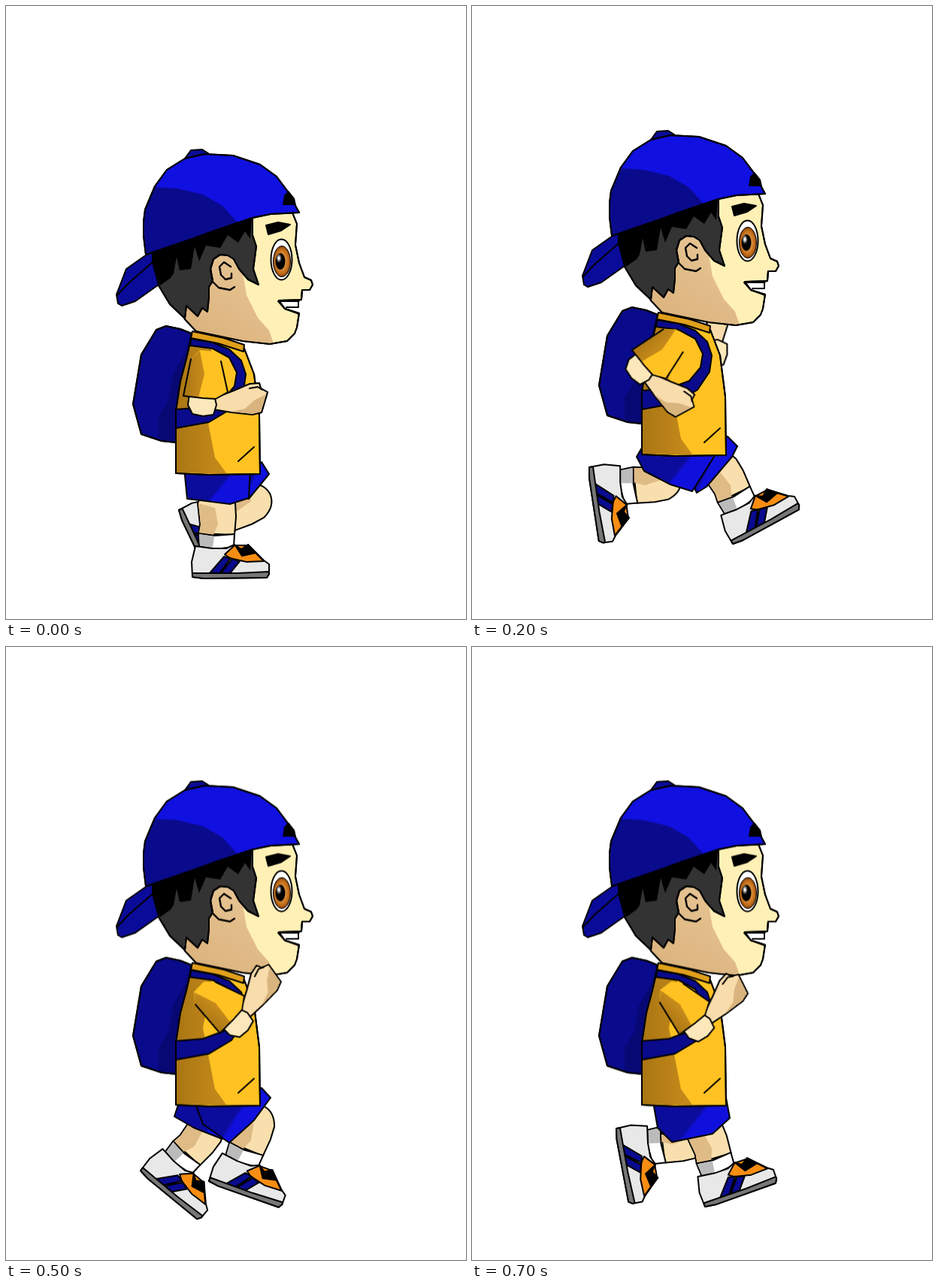
Recreate the animation shown at these times as an HTML page without scripts. Size 612x816 px, loop 0.8 s.

```html
<!DOCTYPE html>
<html lang="en">
<head>
<meta charset="utf-8">
<title>Walking boy</title>
<style>
html, body { margin: 0; width: 100%; height: 100%; overflow: hidden; background: #fff; }
svg { display: block; width: 100vw; height: 100vh; }
.ink { stroke: #000; stroke-width: 2; stroke-linejoin: round; stroke-linecap: round; }
.flat { stroke: none; }
.line { fill: none; }

.pose { visibility: hidden; animation: show .8s step-end infinite; animation-delay: calc(var(--i) * .1s - .8s); }
.bob { animation: bob .4s step-end infinite; }
.arm { transform-origin: 268px 473px; }
.near { animation: near .8s step-end infinite; }
.far { animation: far .8s step-end infinite; }

@keyframes show { 0% { visibility: visible } 12.5%, 100% { visibility: hidden } }
@keyframes bob {
  0%, 100% { transform: translateY(0) }
  25%, 75% { transform: translateY(-12.5px) }
  50% { transform: translateY(-25px) }
}
@keyframes near {
  0%, 50%, 100% { transform: rotate(0deg) }
  12.5% { transform: rotate(28deg) }
  25% { transform: rotate(45deg) }
  37.5% { transform: rotate(34deg) }
  62.5% { transform: rotate(-52deg) }
  75% { transform: rotate(-82deg) }
  87.5% { transform: rotate(-43deg) }
}
@keyframes far {
  0%, 50%, 100% { transform: rotate(0deg) }
  12.5%, 37.5% { transform: rotate(-52deg) }
  25% { transform: rotate(-82deg) }
  62.5% { transform: rotate(28deg) }
  75% { transform: rotate(45deg) }
  87.5% { transform: rotate(34deg) }
}
</style>
</head>
<body>
<svg viewBox="0 0 612 816">
<defs>
  <linearGradient id="shorts" x1="0" y1="0" x2="1" y2=".45">
    <stop offset=".63" stop-color="#0b0b9c"/><stop offset=".68" stop-color="#1010dc"/>
  </linearGradient>
  <linearGradient id="shade">
    <stop offset="0" stop-color="#aa7614"/><stop offset="1" stop-color="#c88c1b"/>
  </linearGradient>
  <linearGradient id="cheek" x1="0" y1="1" x2=".6" y2="0">
    <stop offset="0" stop-color="#d9ae78"/><stop offset="1" stop-color="#e8c796"/>
  </linearGradient>
  <radialGradient id="iris">
    <stop offset=".3" stop-color="#e79a45"/><stop offset=".8" stop-color="#c06c1a"/><stop offset="1" stop-color="#7d3d06"/>
  </radialGradient>
  <radialGradient id="pupil" cx=".35" cy=".3">
    <stop offset=".1" stop-color="#fff"/><stop offset=".4" stop-color="#555"/><stop offset=".6" stop-color="#000"/>
  </radialGradient>

  <path id="cap" d="M186 331L183 306V287L185 271L198 240L214 218L238 203L264 197L302 199L338 211L360 227L375 247L390 275L352 277L328 282L280 298L250 309Z"/>
  <path id="pack" d="M200 431L213 426L232 430L247 436L240 470L230 510L226 581L207 579L180 570L169 530L180 464Z"/>
  <path id="face" d="M200 325L328 270L381 275L387 290L385 318L390 342L397 361L406 365L408 371L404 378H394L393 391L363 392L371 403L390 409L387 428L384 436L374 446L351 450L315 446L253 433L238 417Z"/>
  <path id="hair" d="M192 322L195 343L203 372L218 397L238 416L240 399L255 413L261 402L268 407L270 388V374L275 366L272 350L276 337L285 331L295 332L303 337L310 350L322 364L336 371L329 350L333 320L328 305V270Z"/>
  <path id="shirt" d="M247 440L240 470L232 500L226 540V622L270 624L338 623L337 545L330 490L317 456Z"/>

  <g id="arm">
    <path fill="#f8dcab" d="M272 524L303 512L324 503L337 502L339 509L348 514L340 541L328 544L300 541L276 537Z"/>
    <path class="flat" fill="#d9b47e" d="M346 517L339 540L328 543L300 540L318 536L330 525Z"/>
    <path class="line" d="M324 509L335 507L341 511"/>
    <path fill="#fce7ba" d="M244 516L242 531L248 543L262 546L276 544L280 531L277 518Z"/>
    <path class="flat" fill="#ffc222" d="M246 470L236 519L262 522L279 523L295 514L286 473L277 460L258 458Z"/>
    <path class="flat" fill="url(#shade)" d="M246 470L236 519L256 521L264 490L258 459Z"/>
    <path class="line" d="M246 470L236 519L262 522L279 523L295 514L286 473"/>
  </g>

  <g id="leg">
    <path fill="#f9dfad" d="M8-58L10-70L7-98Q14-118 32-119Q50-118 57-98L58-80L56-56Z"/>
    <path class="flat" fill="#dfbb86" d="M9-58L11-70L8-98L30-92L34-70L28-56Z"/>
    <path fill="#fff" d="M8-58L30-55L56-57L55-40L30-37L9-41Z"/>
    <path class="flat" fill="#bbb" d="M9-57L29-54L27-39L10-41Z"/>
    <path fill="#e8e8e8" d="M4-41L26-38L45-38L56-43L65-38L74-43L84-33L95-22L102-17V-4L99 1L14 2L0 0L-1-20Z"/>
    <path fill="#f78d12" d="M43-30L56-42H74L95-21L72-20L50-25Z"/>
    <path fill="#000" d="M57-42L65-37L74-43L84-32L66-28Z"/>
    <path fill="#0a0a90" d="M42-27L51-25L36-5H23ZM53-24L63-21L50-5H38Z"/>
    <path fill="#777" d="M0-5H60L102-7V-4L99 1L14 2L0 0Z"/>
  </g>
</defs>

<g class="ink" fill="url(#shorts)">
  <g class="pose" style="--i:0">
    <use href="#leg" transform="translate(230 671) rotate(65)"/>
    <path d="M318 620L340 607L350 623L323 656L300 650Z"/>
    <use href="#leg" transform="translate(248 760)"/>
    <path d="M237 615L241 656L298 663L323 655L325 615Z"/>
  </g>
  <g class="pose" style="--i:1">
    <use href="#leg" transform="translate(270 711) rotate(20)"/>
    <path d="M250 600L262 635L297 660L330 630L352 600L340 587Z"/>
    <use href="#leg" transform="translate(179 697) rotate(40)"/>
    <path d="M232 600L224 625L250 640L288 655L310 640L325 600Z"/>
  </g>
  <g class="pose" style="--i:2">
    <use href="#leg" transform="translate(347 716) rotate(-28)"/>
    <path d="M270 590L299 648L312 640L346 600L353 586L340 573Z"/>
    <use href="#leg" transform="translate(156 614) rotate(82)"/>
    <path d="M226 588L219 600L229 619L264 637L293 646L322 600V588Z"/>
  </g>
  <g class="pose" style="--i:3">
    <use href="#leg" transform="translate(326 742) rotate(-27)"/>
    <path d="M300 602H338L346 618L325 638L300 645Z"/>
    <use href="#leg" transform="translate(188 634) rotate(83)"/>
    <path d="M239 600L242 643L300 651L322 646L326 600Z"/>
  </g>
  <g class="pose" style="--i:4">
    <use href="#leg" transform="translate(248 760)"/>
    <path d="M237 615L241 656L298 663L323 655L325 615Z"/>
    <use href="#leg" transform="translate(230 671) rotate(65)"/>
    <path d="M245 612L264 644L322 658L350 623L338 605Z"/>
  </g>
  <g class="pose" style="--i:5">
    <use href="#leg" transform="translate(179 697) rotate(40)"/>
    <path d="M232 600L224 625L250 640L288 655L310 640L325 600Z"/>
    <use href="#leg" transform="translate(270 711) rotate(20)"/>
    <path d="M249 600L262 635L297 660L330 630L352 600L340 587Z"/>
  </g>
  <g class="pose" style="--i:6">
    <use href="#leg" transform="translate(156 614) rotate(82)"/>
    <path d="M226 588L219 600L229 619L264 637L293 646L322 588Z"/>
    <use href="#leg" transform="translate(347 716) rotate(-28)"/>
    <path d="M248 588L256 614L268 630L299 648L312 640L346 600L353 586L340 573Z"/>
  </g>
  <g class="pose" style="--i:7">
    <use href="#leg" transform="translate(192 641) rotate(80)"/>
    <path d="M250 605L252 648L300 652L320 605Z"/>
    <use href="#leg" transform="translate(310 745) rotate(-19)"/>
    <path d="M240 600L247 640L266 659L320 648L343 627L338 600Z"/>
  </g>
</g>

<g class="ink bob">
  <use class="arm far" href="#arm"/>

  <use href="#pack" fill="#0a0a8c"/>
  <path class="flat" fill="#080874" d="M246 437L238 462L222 490L216 525L203 546V574L208 579L226 580L230 510L240 470Z"/>
  <use href="#pack" fill="none"/>

  <use href="#face" fill="#fff0b6"/>
  <path class="flat" fill="url(#cheek)" d="M238 417L200 340L300 300L315 356L320 385L335 415L350 432L356 449L315 446L253 433Z"/>
  <use href="#face" fill="none"/>
  <path class="flat" fill="#fff" d="M365 393H390L389 401H374Z"/>
  <path class="line" d="M394 378L393 390L389 393H362L371 403L390 410M373 401H389V393"/>
  <use href="#hair" fill="#333"/>
  <path class="flat" fill="#000" d="M192 322L195 343L205 372L219 362L223 356L227 334L231 352L246 350L251 320L257 340L266 319L285 322L295 305L309 315L318 300L325 310L328 270Z"/>
  <use href="#hair" fill="none"/>
  <path class="line" stroke-width="2.4" d="M304 374L298 378L283 375L275 367L272 350L276 337L285 331M299 347L290 341L284 347L286 358L292 364L300 362V356"/>
  <path d="M346 292L362 288L378 291L366 299L349 304Z"/>
  <ellipse cx="366.500" cy="337.500" rx="14" ry="27" fill="#fff"/>
  <ellipse cx="367" cy="340" rx="11.500" ry="20.500" fill="url(#iris)" stroke-width="1"/>
  <ellipse class="flat" cx="365" cy="340" rx="6.500" ry="11" fill="url(#pupil)"/>

  <path fill="#0b0b9a" d="M187 331L160 350L147 384L149 396L154 399L172 393L203 371L195 341V328Z"/>
  <path class="line" d="M148 385L163 369L195 341"/>
  <path fill="#0b0b9a" d="M238 203L246 192L261 191L269 196L264 198Z"/>
  <use href="#cap" fill="#1010e0"/>
  <path class="flat" fill="#0a0a8c" d="M198 241L228 243L262 251L288 266L308 288L280 298L250 309L186 331L183 306V287L185 271Z"/>
  <use href="#cap" fill="none"/>
  <path class="flat" d="M368 265L370 252L376 246L384 256L386 265Z"/>

  <use href="#shirt" fill="#ffc222"/>
  <path class="flat" fill="url(#shade)" d="M247 441L240 470L232 500L227 540V621L294 623L278 601L270 560L262 520L275 448Z"/>
  <use href="#shirt" fill="none"/>
  <path fill="#e0a01c" d="M248 433L290 442L317 451L316 460L282 449L246 442Z"/>
  <path class="line" d="M309 606L330 587"/>
  <path fill="#0a0a8c" d="M246 443L275 448L297 457L313 472L319 490L316 512L300 536L270 554L226 562V537L262 534L289 524L304 506L307 488L297 468L275 456L245 452Z"/>

  <use class="arm near" href="#arm"/>
</g>
</svg>
</body>
</html>
```
